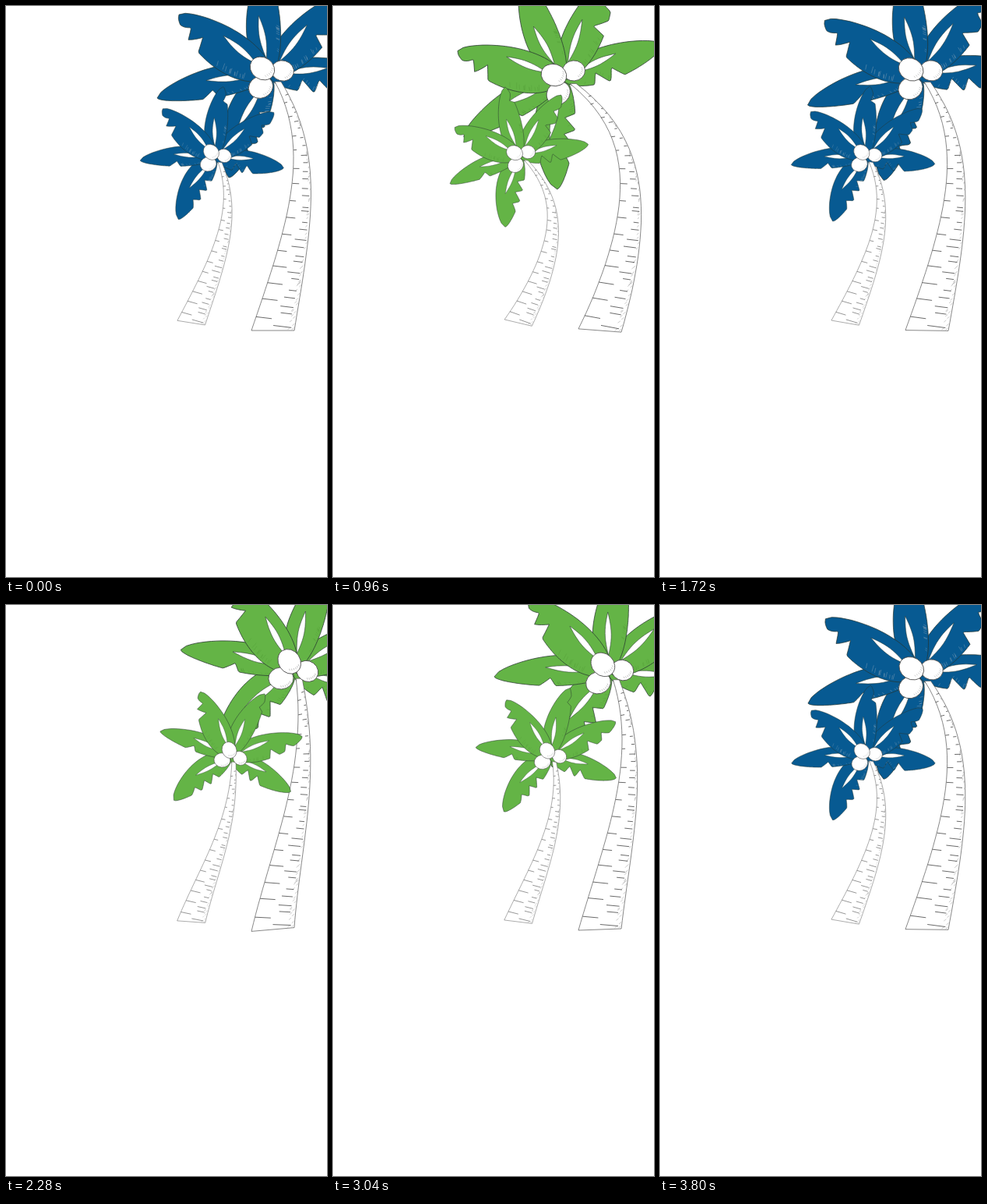
Animation of 412x732 px, one loop 3840 ms. Source, as an HTML page:

```html
<!DOCTYPE html>
<html lang="en">
<head>
<meta charset="utf-8">
<title>Palm trees</title>
<style>
  html, body { margin: 0; width: 100%; height: 100%; overflow: hidden; background: #fff; }
  svg { display: block; width: 412px; height: 732px; }
  .leaf { fill: var(--leaf); stroke: #26352f; stroke-width: .7; stroke-linejoin: round; }
  .slit { fill: #fff; stroke: #26352f; stroke-width: .5; }
  .hatch { fill: none; stroke: var(--hatch); stroke-width: .6; opacity: .7; }
  .bark { fill: #fff; stroke: #555; stroke-width: .7; stroke-linejoin: round; }
  .ring { fill: none; stroke: #444; stroke-width: .8; }
  .shade { fill: none; stroke: #aaa; stroke-width: .6; }
  .nut { fill: #fff; stroke: #444; stroke-width: .8; }
</style>
</head>
<body>
<svg id="stage" viewBox="0 0 412 732" xmlns="http://www.w3.org/2000/svg"></svg>
<script>
const LOOP = 3840, STEP = 40, SWAP = 600;
const stage = document.getElementById('stage');

// Crown pivot, ground level and the point where the leaves meet.
const pivot = [345, 97], ground = 416, hub = [338, 88];

// Sway angle in degrees at key times.
const sway = [[0, 0], [560, -11.5], [1180, -20.5], [1700, -4], [2340, 22.3], [2800, 13.5], [3840, -3.6]];

// Tip, bulge of the smooth and of the toothed edge, notch places along the leaf.
const leaves = [
  { tip: [286, 220], smooth: 33, toothed: -19, notches: [0.35, 0.5, 0.66] },
  { tip: [194, 118], smooth: 24, toothed: -15, notches: [0.51] },
  { tip: [474, 88], smooth: -22, toothed: 22, notches: [0.31, 0.47] },
  { tip: [438, -16], smooth: -24, toothed: 25, notches: [0.54, 0.76] },
  { tip: [332, -50], smooth: -27, toothed: 17, notches: [0.8] },
  { tip: [222, 11], smooth: 23, toothed: -31, notches: [0.7, 0.84] }
];
const nuts = [[327, 104, 16, 14, -25], [355, 83, 14.5, 13, 15], [329, 80, 16.5, 14, 35]];

// The small palm is the same drawing, scaled and leaning.
const places = ['', 'translate(272 200) rotate(9) scale(.655) translate(-345 -97)'];

function add(parent, tag, attrs) {
  const el = document.createElementNS('http://www.w3.org/2000/svg', tag);
  for (const k in attrs) el.setAttribute(k, attrs[k]);
  parent.appendChild(el);
  return el;
}

function random(seed) {
  return () => (seed = (seed * 16807) % 2147483647) / 2147483647;
}

const fmt = p => p[0].toFixed(1) + ' ' + p[1].toFixed(1);
const stroke = (a, b) => 'M' + fmt(a) + 'L' + fmt(b);
const closed = pts => 'M' + pts.map(fmt).join('L') + 'Z';
const sample = (n, f) => Array.from({ length: n + 1 }, (_, i) => f(i / n));
const marks = (n, f) => Array.from({ length: n }, (_, i) => f(i));

// Smooth curve through the keys that never overshoots them.
function ease(keys, t) {
  let i = 0;
  while (i < keys.length - 2 && t >= keys[i + 1][0]) i++;
  const rate = k => (keys[k + 1][1] - keys[k][1]) / (keys[k + 1][0] - keys[k][0]);
  const slope = k => {
    if (k === 0) return rate(0);
    if (k === keys.length - 1) return rate(k - 1);
    const a = rate(k - 1), b = rate(k);
    return a * b <= 0 ? 0 : 2 * a * b / (a + b);
  };
  const [t0, v0] = keys[i], [t1, v1] = keys[i + 1], h = t1 - t0, f = (t - t0) / h, g = 1 - f;
  return v0 * (1 + 2 * f) * g * g + v1 * f * f * (3 - 2 * f) + h * f * g * (slope(i) * g - slope(i + 1) * f);
}

// Leaf half-width along its length, and how much a notch leaves of it.
const bulge = u => Math.max(0, Math.sin(Math.PI * u ** 0.8)) ** 0.6;
const bite = (u, notches) => notches.reduce((k, n) =>
  k - 0.7 * Math.max(0, 1 - (u < n ? (n - u) / 0.04 : (u - n) / 0.1)), 1);

function drawLeaf(parent, { tip, smooth, toothed, notches }, rnd) {
  const dx = tip[0] - hub[0], dy = tip[1] - hub[1], len = Math.hypot(dx, dy);
  const at = (u, n) => [hub[0] + dx * u - dy / len * n, hub[1] + dy * u + dx / len * n];

  const outer = sample(24, u => at(u, smooth * bulge(u)));
  const inner = sample(80, u => at(1 - u, toothed * bulge(1 - u) * bite(1 - u, notches)));
  add(parent, 'path', { d: closed(outer.concat(inner)), class: 'leaf' });

  const slit = side => v => {
    const u = 0.15 + 0.4 * v;
    return at(u, smooth * 0.7 * u + side * 4 * Math.sin(Math.PI * v));
  };
  const lens = sample(12, slit(1)).concat(sample(12, slit(-1)).reverse());
  add(parent, 'path', { d: closed(lens), class: 'slit' });

  const scratch = marks(12, () => {
    const u = 0.18 + rnd() * 0.27, n = toothed * bulge(u) * bite(u, notches);
    return stroke(at(u, n * 0.9), at(u + 0.015, n * (0.6 + rnd() * 0.2)));
  });
  add(parent, 'path', { d: scratch.join(''), class: 'hatch' });
}

function drawNut(parent, [x, y, rx, ry, tilt]) {
  add(parent, 'ellipse', { cx: x, cy: y, rx, ry, transform: `rotate(${tilt} ${x} ${y})`, class: 'nut' });
  const d = sample(5, v => {
    const w = 0.1 + v * 1.1, p = [x + rx * 0.82 * Math.cos(w), y + ry * 0.82 * Math.sin(w)];
    return stroke(p, [p[0] - 1.5, p[1] - 2]);
  });
  add(parent, 'path', { d: d.join(''), class: 'shade' });
}

function build(place) {
  const rnd = random(11), root = add(stage, 'g', { transform: place });
  const back = add(root, 'g', {});
  leaves.forEach(l => drawLeaf(back, l, rnd));
  const bark = add(root, 'path', { class: 'bark' });
  const shade = add(root, 'path', { class: 'shade' });
  const ring = add(root, 'path', { class: 'ring' });
  const front = add(root, 'g', {});
  nuts.forEach(n => drawNut(front, n));
  return { crown: [back, front], bark, shade, ring };
}

// Trunk marks: height, start and end across the trunk.
const rnd = random(7);
const rings = marks(42, i => {
  const s = 0.02 + 0.94 * (i + rnd() * 0.7) / 42, w = 0.2 + rnd() * 0.25;
  const from = i % 3 === 1 ? 0.02 : 0.94 - w - rnd() * 0.1;
  return [s, from, from + w];
});
const specks = marks(70, () => [rnd() * 0.93, 0.84 + rnd() * 0.1]);

function draw(time) {
  const t = Math.floor((time % LOOP) / STEP) * STEP;
  const blue = Math.floor(t / SWAP) % 2 === 0;
  stage.style.setProperty('--leaf', blue ? '#075a92' : '#64b446');
  stage.style.setProperty('--hatch', blue ? '#8aa5ba' : '#55a039');

  const a = ease(sway, t), shift = 1.75 * a - 0.023 * a * a, lift = -0.13 * a;
  const turn = `translate(${shift.toFixed(2)} ${lift.toFixed(2)}) rotate(${a.toFixed(2)} ${pivot.join(' ')})`;

  // Point on the bent trunk: s from ground to crown, f from left to right.
  const spot = (s, f, tilt = 0) => {
    const off = (f - 0.5) * (8 + 47 * (1 - s) ** 1.2), top = s ** 5;
    const x = 342.5 + 81 * s - 74.5 * s ** 3.6 + off;
    const y = ground - (ground - pivot[1]) * s + off * tilt;
    return [x + shift * (top - 1.1 * s * (1 - s) ** 2), y + lift * top - off * a * 0.004 * (1 - s) ** 4];
  };
  const slant = s => 0.12 - 0.6 * s ** 4;
  const edge = sample(30, s => spot(s, 0)).concat(sample(30, s => spot(1 - s, 1)));
  const ringPath = rings.map(([s, p, q]) => stroke(spot(s, p, slant(s)), spot(s, q, slant(s)))).join('');
  const speckPath = specks.map(([s, f]) => stroke(spot(s, f), spot(s + 0.008, f + 0.05))).join('');

  palms.forEach(p => {
    p.crown.forEach(g => g.setAttribute('transform', turn));
    p.bark.setAttribute('d', closed(edge));
    p.ring.setAttribute('d', ringPath);
    p.shade.setAttribute('d', speckPath);
  });
}

const palms = places.map(build);
const start = performance.now();
function tick() {
  draw(performance.now() - start);
  requestAnimationFrame(tick);
}
draw(0);
requestAnimationFrame(tick);
</script>
</body>
</html>
```
